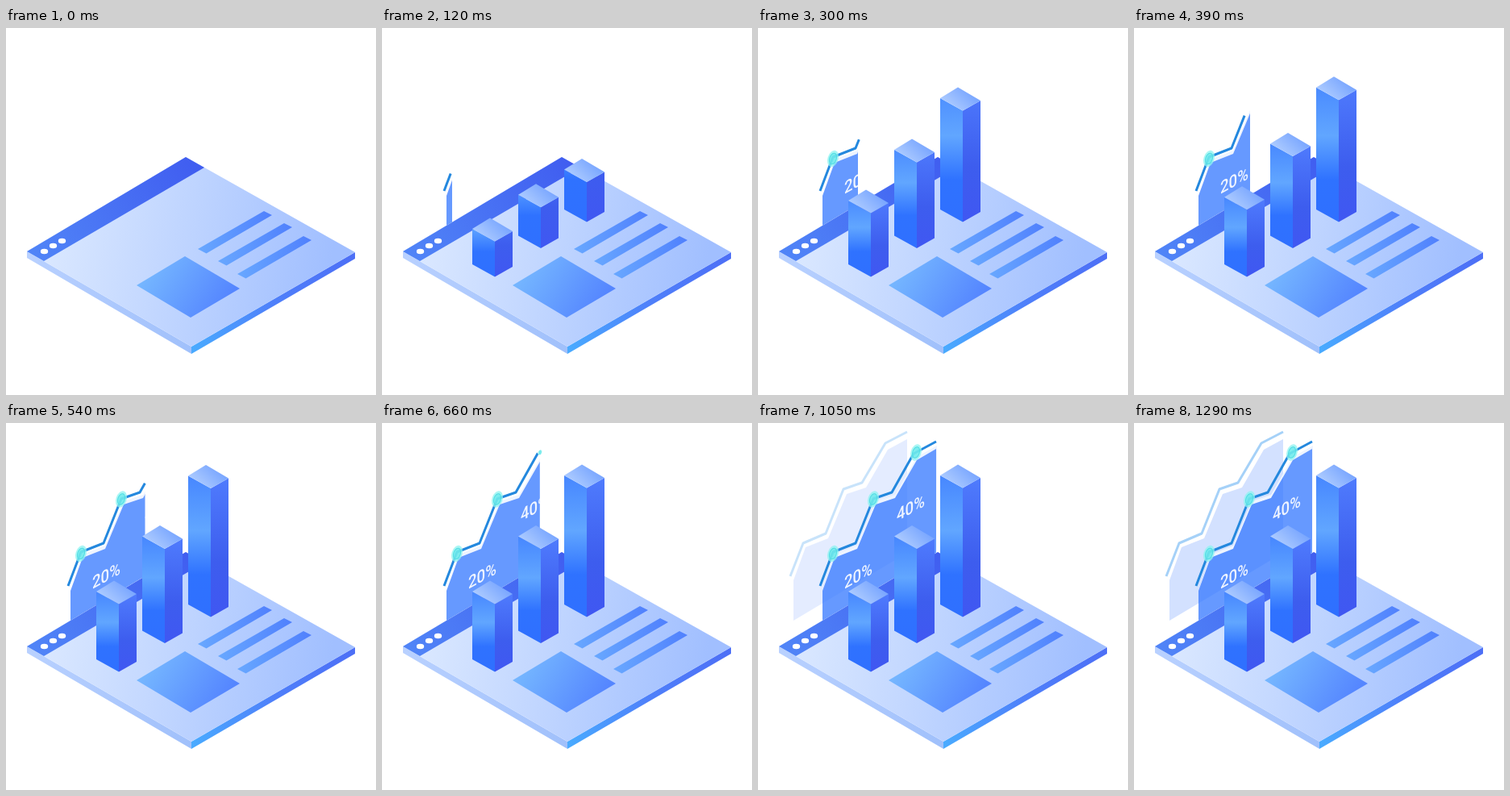
Recreate the animation shown at these times as an HTML page. Size 459x455 px, loop 3390 ms.

```html
<!DOCTYPE html>
<html lang="en">
<head>
<meta charset="utf-8">
<title>Isometric charts</title>
<style>
  html, body { margin: 0; width: 100%; height: 100%; overflow: hidden; background: #fff; }
  svg { display: block; width: 100%; height: 100%; }
  text { font: 500 21.5px Roboto, Inter, sans-serif; fill: #fff; fill-opacity: .9; }
  .line { fill: none; stroke-width: 3; stroke-linejoin: round; }
</style>
</head>
<body>
<svg viewBox="0 0 459 455">
  <defs>
    <linearGradient id="top" gradientUnits="userSpaceOnUse" x1="60" y1="250" x2="400" y2="310">
      <stop stop-color="#d9e7ff"/><stop offset="1" stop-color="#a1bfff"/>
    </linearGradient>
    <linearGradient id="head" gradientUnits="userSpaceOnUse" x1="36" y1="280" x2="235" y2="165">
      <stop stop-color="#5084f7"/><stop offset="1" stop-color="#405df0"/>
    </linearGradient>
    <linearGradient id="sideL"><stop stop-color="#b9d1ff"/><stop offset="1" stop-color="#a0c0fb"/></linearGradient>
    <linearGradient id="sideR"><stop stop-color="#49abff"/><stop offset=".5" stop-color="#4f80fa"/><stop offset="1" stop-color="#4d6ff6"/></linearGradient>
    <linearGradient id="tile" x2="1" y2=".4"><stop offset=".1" stop-color="#78bbff"/><stop offset="1" stop-color="#5586ff"/></linearGradient>
    <linearGradient id="row"><stop stop-color="#68a8ff"/><stop offset="1" stop-color="#5080fd"/></linearGradient>
    <linearGradient id="cap" x1=".1" y1=".8" x2=".9" y2=".3"><stop stop-color="#b2cfff"/><stop offset="1" stop-color="#75a3ff"/></linearGradient>
    <clipPath id="wipe"><rect id="wipeBox" x="70" width="0" height="300"/></clipPath>
  </defs>

  <g id="back">
    <path fill="#d3e1ff" d="M44 245V195L59 154L87 143L110 88L134 80L161 33L185 20V161Z"/>
    <path class="line" stroke="#a5d1f8" d="M40 190L56 149L84 137L106 82L129 74L158 25L185 11"/>
  </g>

  <g clip-path="url(#wipe)">
    <g id="area">
      <path fill="#eef4ff" d="M80 208L95 163L123 152L146 97L170 89L197 42L222 28V161L221 32L197 46L170 93L146 101L123 156L95 167Z"/>
      <path fill="#3377ff" fill-opacity=".75" d="M80 245V208L95 167L123 156L146 101L170 93L197 46L221 32V161Z"/>
    </g>
    <text transform="matrix(.866 -.48 0 1 107 206)">20%</text>
    <text transform="matrix(.866 -.48 0 1 172 122)">40%</text>
  </g>
  <path id="trend" class="line" stroke="#2488de" pathLength="245"
        d="M77 202L93 160L121 149L143 94L166 86L193 38L221 23"/>
  <g id="marks"></g>

  <g id="board"></g>
  <g id="bars"></g>
</svg>
<script>
const LOOP = 3390, STEP = 30, END = 1290;
const $ = id => document.getElementById(id);
const clamp = v => Math.max(0, Math.min(1, v));

function add(parent, tag, attrs) {
  const el = document.createElementNS("http://www.w3.org/2000/svg", tag);
  for (const k in attrs) el.setAttribute(k, attrs[k]);
  return parent.appendChild(el);
}
const poly = (parent, points, fill) => add(parent, "polygon", { points, fill });

// Board with window header and content blocks
const board = $("board");
poly(board, "26,277 230,395 230,404 26,285", "url(#sideL)");
poly(board, "230,395 433,278 433,286 230,404", "url(#sideR)");
poly(board, "26,277 223,160 433,278 230,395", "url(#top)");
poly(board, "26,277 223,160 246,173 47,289", "url(#head)");
for (const [cx, cy] of [[47.5, 277], [58.5, 270], [69.5, 264]])
  add(board, "ellipse", { cx, cy, rx: 4.7, ry: 3.2, fill: "#fff" });
poly(board, "222,283 290,323 229,359 162,319", "url(#tile)");
for (const [x, y] of [[238, 274], [263, 289], [287, 305]])
  poly(board, [x, y, x + 82, y - 47, x + 92, y - 42, x + 10.5, y + 5.5], "url(#row)");

// Markers, each shown once the trend line has reached it
const marks = [[93, 162, 45], [143, 94.5, 134], [196, 36.5, 213]].map(([x, y, at]) => {
  const el = add($("marks"), "g", {});
  const turn = "rotate(18)";
  add(el, "ellipse", { rx: 6.6, ry: 10.5, fill: "#8df3f0", "fill-opacity": .75, transform: turn });
  add(el, "ellipse", { rx: 4.2, ry: 7, fill: "#5fe6ea", "fill-opacity": .6,
    stroke: "#4fdde4", "stroke-width": 1, transform: turn });
  return { el, x, y, at };
});

// Vertical gradient fixed to the grown bar, so growth uncovers it
function faceFill(id, y1, y2, stops) {
  const g = add(document.querySelector("defs"), "linearGradient",
    { id, gradientUnits: "userSpaceOnUse", x1: 0, x2: 0, y1, y2 });
  for (const [offset, color] of stops) add(g, "stop", { offset, "stop-color": color });
  return `url(#${id})`;
}

// x, y: front bottom corner; full: final height; ease: start handle; time: duration
const bars = [
  { x: 140, y: 308.5, full: 84, ease: .2, time: 430 },
  { x: 197, y: 273, full: 117, ease: .23, time: 480 },
  { x: 254, y: 240.5, full: 160, ease: .25, time: 560 }
].map((b, i) => {
  const g = add($("bars"), "g", {}), low = b.y, high = b.y - b.full;
  const left = faceFill("l" + i, high - 15, low - 5,
    [[0, "#4787ff"], [.4, "#61a6ff"], [.72, "#2f72ff"], [1, "#2f70ff"]]);
  const right = faceFill("r" + i, high - 12, low,
    [[0, "#4f7bfd"], [.6, "#3d5dee"], [1, "#4057f2"]]);
  return { ...b, g, left: poly(g, "", left), right: poly(g, "", right), cap: poly(g, "", "url(#cap)") };
});

// Cubic bezier (a, 0, 0, 1)
function grow(x, a) {
  let lo = 0, hi = 1;
  for (let i = 0; i < 24; i++) {
    const s = (lo + hi) / 2;
    if (3 * a * s * (1 - s) ** 2 + s ** 3 < x) lo = s; else hi = s;
  }
  return lo * lo * (3 - 2 * lo);
}

function lerpKeys(keys, t) {
  if (t <= keys[0][0]) return keys[0][1];
  for (let i = 1; i < keys.length; i++) {
    const [t0, v0] = keys[i - 1], [t1, v1] = keys[i];
    if (t <= t1) return v0 + (v1 - v0) * (t - t0) / (t1 - t0);
  }
  return keys[keys.length - 1][1];
}
const wipeKeys = [[30, 72], [120, 87], [210, 104], [390, 144], [540, 172.5], [800, 223]];

function draw(t) {
  for (const b of bars) {
    const p = clamp((t - 30) / b.time);
    b.g.setAttribute("display", p > 0 ? "inline" : "none");
    const { x, y } = b, top = y - b.full * grow(p, b.ease);
    const L = x - 28, R = x + 22;
    b.left.setAttribute("points", [L, top - 15.5, x, top, x, y, L, y - 15.5]);
    b.right.setAttribute("points", [x, top, R, top - 12.5, R, y - 12.5, x, y]);
    b.cap.setAttribute("points", [L, top - 15.5, x - 6, top - 29, R, top - 12.5, x, top]);
  }

  $("wipeBox").setAttribute("width", lerpKeys(wipeKeys, t) - 70);

  const drawn = Math.min(245, Math.max(0, .353 * (t - 55)));
  $("trend").setAttribute("stroke-dasharray", `${drawn} 500`);
  $("trend").setAttribute("display", drawn > 0 ? "inline" : "none");
  for (const m of marks) {
    const s = clamp((drawn - m.at + 4) / 14);
    m.el.setAttribute("transform", `translate(${m.x} ${m.y}) scale(${s})`);
  }

  $("back").setAttribute("opacity", clamp((t - 690) / 600));
}

const start = performance.now();
function frame() {
  const t = (performance.now() - start) % LOOP;
  draw(Math.min(END, Math.floor(t / STEP) * STEP));
  requestAnimationFrame(frame);
}
frame();
</script>
</body>
</html>
```
